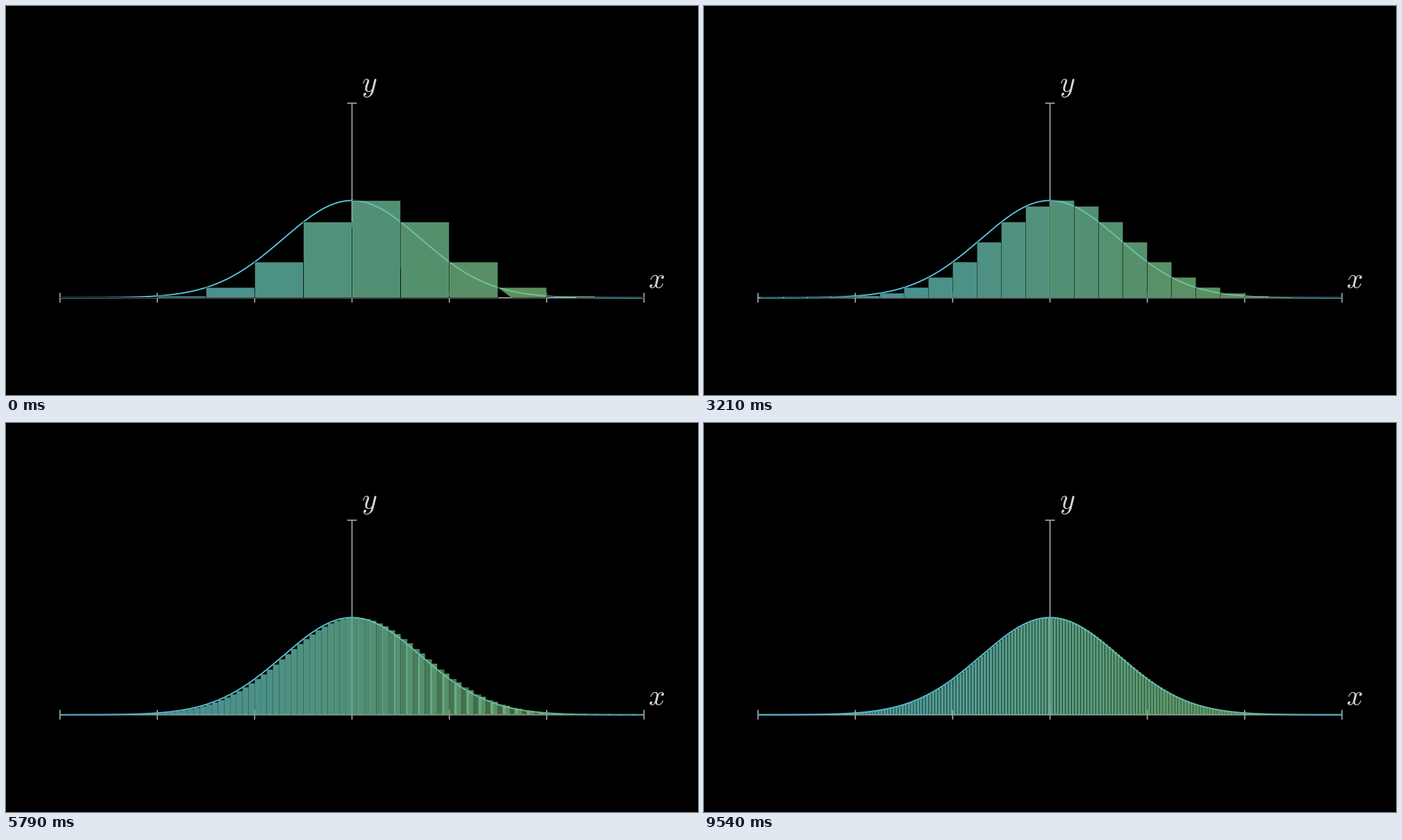
Write a matplotlib script that moves like this. It is 997x561 px and loops after 9580 ms.

```python
import numpy as np
import matplotlib.pyplot as plt
from matplotlib.animation import FuncAnimation
from matplotlib.collections import PolyCollection

W, H, DPI = 997, 561, 64
PX = 72 / DPI                 # points per pixel
UNIT = H / 4                  # pixels per axis unit
X0, Y0 = W / 2, H * 0.75      # origin of the axes
X_MAX = 3

BLUE = np.array([88, 196, 221]) / 255
GREEN = np.array([131, 193, 103]) / 255
GREY = "#a6a6a6"
OPACITY = 0.75
STROKE = 0.7                  # bar outline in pixels, halved at each step

LOOP, STEP = 9580, 20
BARS = 12
CREATE_START, CREATE_TIME = -886, 1500
SPLIT_START, SPLIT_TIME = 580, 2000


def bell(x):
    return np.exp(-x ** 2)


def smooth(t):
    def sig(u):
        return 1 / (1 + np.exp(-u))
    low = sig(-5)
    t = np.clip(t, 0, 1)
    return (sig(10 * (t - 0.5)) - low) / (1 - 2 * low)


def lagged(t, n):
    """Progress of each of n bars, started one after the other."""
    return np.clip(2 * smooth(t) - np.arange(n) / n, 0, 1)


def mix(a, b, p):
    return a + (b - a) * p


def bars(n):
    """Left edge, right edge, height and colour of n bars."""
    dx = 2 * X_MAX / n
    left = -X_MAX + dx * np.arange(n)
    colour = mix(BLUE, GREEN, np.linspace(0, 1, n)[:, None])
    return left, left + dx, bell(left), colour


def outlines(left, right, height, part):
    """Closed bar outlines, drawn clockwise from top left up to part."""
    l, r = X0 + UNIT * left, X0 + UNIT * right
    top, base = Y0 - UNIT * height, np.full_like(l, Y0)
    xs = np.stack([l, r, r, l, l])
    ys = np.stack([top, top, base, base, top])
    cols = np.arange(len(l))
    pts = []
    for j in range(5):
        q = np.minimum(4 * part, j)
        k = np.minimum(q.astype(int), 3)
        pts.append(np.stack([mix(c[k, cols], c[k + 1, cols], q - k)
                             for c in (xs, ys)], axis=-1))
    return np.stack(pts, axis=1)


def create(t):
    left, right, height, colour = bars(BARS)
    verts = outlines(left, right, height, lagged(t, BARS))
    return verts, colour, np.full(BARS, OPACITY), np.full(BARS, STROKE)


def split(level, t):
    """Each bar becomes two; the left half fades in."""
    n = BARS * 2 ** (level + 1)
    i = np.arange(n)
    p = lagged(t, n)
    old = [v[i // 2] for v in bars(n // 2)]
    new = bars(n)
    left, right, height = (mix(a, b, p) for a, b in zip(old[:3], new[:3]))
    colour = mix(old[3], new[3], p[:, None])
    shown = np.where(i % 2 == 0, 0.0, 1.0)
    alpha = OPACITY * mix(shown, 1, p)
    stroke = STROKE / 2 ** level * mix(shown, 0.5, p)
    return outlines(left, right, height, np.ones(n)), colour, alpha, stroke


fig = plt.figure(figsize=(W / DPI, H / DPI), dpi=DPI, facecolor="black")
ax = fig.add_axes([0, 0, 1, 1])
ax.set_xlim(0, W)
ax.set_ylim(H, 0)
ax.axis("off")


def line(xs, ys, color=GREY, width=1.7, z=1):
    ax.plot(xs, ys, color=color, lw=width * PX, zorder=z, snap=False,
            solid_capstyle="butt")


line([X0 - X_MAX * UNIT, X0 + X_MAX * UNIT], [Y0, Y0])
line([X0, X0], [Y0, Y0 - 2 * UNIT])
line([X0 - 7, X0 + 7], [Y0 - 2 * UNIT] * 2)
for x in range(-X_MAX, X_MAX + 1):
    line([X0 + x * UNIT] * 2, [Y0 - 7, Y0 + 7])

xs = np.linspace(-X_MAX, X_MAX, 400)
line(X0 + UNIT * xs, Y0 - UNIT * bell(xs), color=BLUE, width=1.9, z=2)

for name, x, y in (("$x$", 925, 407), ("$y$", 511.5, 124)):
    ax.text(x, y, name, color="#d4d4d4", fontsize=42 * PX,
            math_fontfamily="cm", ha="left", va="baseline")

rects = PolyCollection([], closed=False, zorder=3, snap=False)
ax.add_collection(rects, autolim=False)


def draw(frame):
    ms = frame * STEP
    if ms < SPLIT_START:
        state = create((ms - CREATE_START) / CREATE_TIME)
    else:
        level, rest = divmod(ms - SPLIT_START, SPLIT_TIME)
        state = split(int(level), rest / SPLIT_TIME)
    verts, colour, alpha, stroke = state
    rects.set_verts(verts, closed=False)
    rects.set_facecolor(np.column_stack([colour, alpha]))
    rects.set_edgecolor("black")
    rects.set_linewidth(stroke * PX)
    return (rects,)


anim = FuncAnimation(fig, draw, frames=LOOP // STEP, interval=STEP,
                     init_func=lambda: draw(0), repeat=True,
                     repeat_delay=0, blit=False)
plt.show()
```
